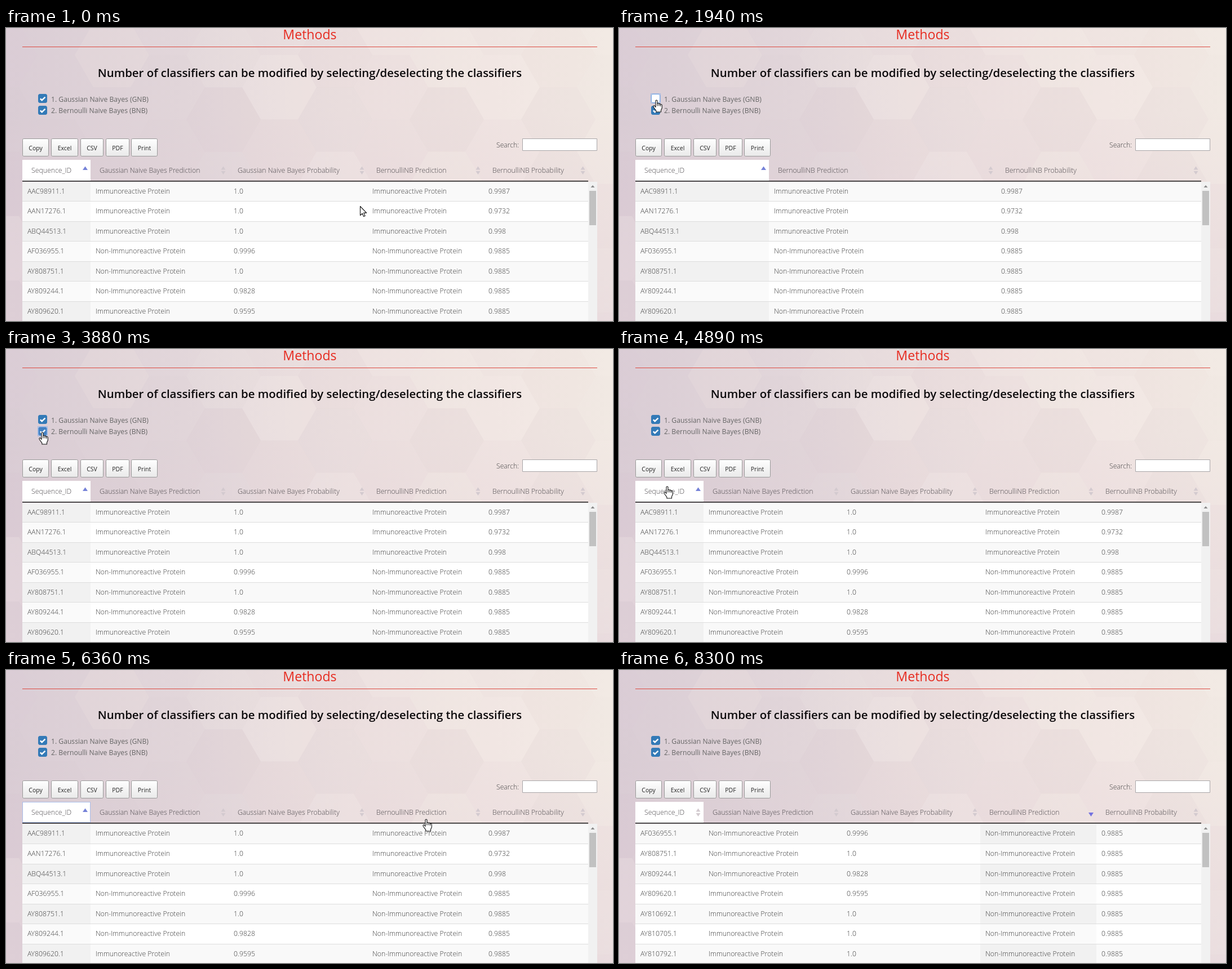
These frames come from a looping animation (1077 by 520 pixels, 8.61 s). An HTML page with a canvas:

```html
<!DOCTYPE html>
<html lang="en">
<head>
<meta charset="utf-8">
<title>Methods</title>
<style>
html, body { margin: 0; width: 100%; height: 100%; overflow: hidden; background: #e6dadd; }
canvas { display: block; width: 1077px; height: 520px; }
</style>
</head>
<body>
<canvas id="stage" width="1077" height="520"></canvas>
<script>
const W = 1077, H = 520, LOOP = 8610;
const ctx = document.getElementById('stage').getContext('2d');

const parse = s => s.split('\n').map(line => line.trim().split(' '));
const first = parse(`AAC98911.1 I 1.0 I 0.9987
  AAN17276.1 I 1.0 I 0.9732
  ABQ44513.1 I 1.0 I 0.998
  AF036955.1 N 0.9996 N 0.9885
  AY808751.1 N 1.0 N 0.9885
  AY809244.1 N 0.9828 N 0.9885
  AY809620.1 I 0.9595 N 0.9885
  AY810692.1 I 1.0 N 0.9885
  AY810705.1 I 1.0 N 0.9885
  AY810792.1 I 1.0 N 0.9885`);
const last = parse(`M14654.1 I 0.9979 N 0.9885
  EF553319.1 I 0.9999 N 0.9885
  CCD59145.1 I 1.0 I 0.9476
  AY816000.2 I 1.0 N 0.9885
  AY815815.1 N 0.9999 N 0.9885
  AY815419.1 I 1.0 N 0.9885
  AY815196.1 I 1.0 N 0.9885`);
const orders = {
  idAsc: first.slice(0, 7),
  idDesc: last,
  predAsc: [...first.slice(0, 3), last[2], ...first.slice(3, 6)],
  predDesc: first.slice(3)
};
const words = { I: 'Immunoreactive Protein', N: 'Non-Immunoreactive Protein' };
const heads = ['Sequence_ID', 'Gaussian Naive Bayes Prediction', 'Gaussian Naive Bayes Probability',
  'BernoulliNB Prediction', 'BernoulliNB Probability'];
const widths = [121, 245, 246, 206, 186];
const LEFT = 29, RIGHT = 1033;

function text(s, x, y, size, color, weight = 300, align = 'left') {
  ctx.font = `${weight} ${size}px "Open Sans", "Noto Sans", sans-serif`;
  ctx.textAlign = align;
  ctx.fillStyle = color;
  ctx.fillText(s, x, y);
}

function rect(x, y, w, h, color) {
  ctx.fillStyle = color;
  ctx.fillRect(x, y, w, h);
}

function box(x, y, w, h, r, fill, border) {
  ctx.beginPath();
  ctx.roundRect(x + .5, y + .5, w - 1, h - 1, r);
  ctx.fillStyle = fill;
  ctx.fill();
  ctx.strokeStyle = border;
  ctx.lineWidth = 1;
  ctx.stroke();
}

// Triangle with its base at y and its point dy away
function tri(x, y, dy, half, color) {
  ctx.beginPath();
  ctx.moveTo(x - half, y);
  ctx.lineTo(x + half, y);
  ctx.lineTo(x, y + dy);
  ctx.fillStyle = color;
  ctx.fill();
}

function paintBackdrop(c) {
  const g = c.createLinearGradient(0, 200, W, 90);
  [[0, '#dacdd5'], [.3, '#e1d5d9'], [.55, '#ebdfde'], [.8, '#efe4e1'], [1, '#f2eae4']]
    .forEach(([p, color]) => g.addColorStop(p, color));
  c.fillStyle = g;
  c.fillRect(0, 0, W, H);
  const v = c.createLinearGradient(0, 150, 0, H);
  v.addColorStop(0, 'rgba(228,208,218,0)');
  v.addColorStop(1, 'rgba(228,208,218,.45)');
  c.fillStyle = v;
  c.fillRect(0, 0, W, H);
  let seed = 11;
  const rnd = () => (seed = seed * 16807 % 2147483647) / 2147483647;
  const R = 66, step = R * Math.sqrt(3);
  for (let i = 0; i < 12; i++) {
    for (let j = -1; j < 6; j++) {
      const x = -10 + i * R * 1.5, y = 48 + (j + (i % 2) / 2) * step, a = rnd();
      c.beginPath();
      for (let k = 0; k < 6; k++) {
        c.lineTo(x + R * Math.cos(k * Math.PI / 3), y + R * Math.sin(k * Math.PI / 3));
      }
      c.fillStyle = a > .5 ? `rgba(255,246,238,${(a - .5) * .34})` : `rgba(190,165,180,${(.5 - a) * .14})`;
      c.fill();
    }
  }
}
const backdrop = document.createElement('canvas');
backdrop.width = W;
backdrop.height = H;
paintBackdrop(backdrop.getContext('2d'));

function checkbox(y, on, focus) {
  if (focus) {
    ctx.strokeStyle = 'rgba(120,170,235,.55)';
    ctx.lineWidth = 1;
    ctx.strokeRect(56.5, y - .5, 17, 17);
  }
  const fill = on ? (focus ? '#4381c2' : '#337ab7') : '#fff';
  box(57, y, 16, 16, 2.5, fill, focus ? '#78a8e4' : on ? '#337ab7' : '#aaa');
  if (!on) return;
  ctx.beginPath();
  ctx.moveTo(60.8, y + 8.3);
  ctx.lineTo(63.7, y + 11.2);
  ctx.lineTo(69.5, y + 5.6);
  ctx.strokeStyle = '#fff';
  ctx.lineWidth = 2.4;
  ctx.stroke();
}

function button(label, x, w) {
  const g = ctx.createLinearGradient(0, 196, 0, 228);
  g.addColorStop(0, '#fff');
  g.addColorStop(1, '#e9e9e9');
  box(x, 196, w, 32, 2, g, '#999');
  text(label, x + w / 2, 216.5, 10.5, '#222', 400, 'center');
}

function page(s) {
  ctx.drawImage(backdrop, 0, 0);
  text('Methods', 539, 20, 23.1, '#e62b20', 500, 'center');
  rect(29, 33, 1020, 1, '#dc4a41');
  text('Number of classifiers can be modified by selecting/deselecting the classifiers',
    539, 87, 20.4, '#0c0a0c', 600, 'center');
  checkbox(117, s.gnb, s.focus === 1);
  checkbox(138, s.bnb, s.focus === 2);
  text('1. Gaussian Naive Bayes (GNB)', 80, 131, 12.15, '#666', 400);
  text('2. Bernoulli Naive Bayes (BNB)', 80, 151, 12.15, '#666', 400);
  [['Copy', 29, 47], ['Excel', 80, 48], ['CSV', 132, 41], ['PDF', 177, 42], ['Print', 222, 47]]
    .forEach(b => button(...b));
  text('Search:', 870, 212, 12.2, '#444');
  box(916, 196, 133, 22, 0, '#fff', '#a9a6a8');
}

function table(s) {
  const cols = s.cols, total = cols.reduce((sum, c) => sum + widths[c], 0);
  const scale = (RIGHT - LEFT) / total;
  const xs = [LEFT];
  cols.forEach((c, i) => xs.push(xs[i] + widths[c] * scale));
  const edge = xs.map(Math.round);
  const [key, dir] = s.order.startsWith('id') ? [0, s.order.slice(2)] : [3, s.order.slice(4)];

  rect(LEFT, 234, edge[1] - LEFT, 37, '#fff');
  cols.forEach((c, i) => {
    text(heads[c], edge[i] + 16, 257, 12.27, '#504c50');
    const x = edge[i + 1] - 9.5;
    if (c !== key) {
      tri(x, 251.5, -6, 4, '#d3cacf');
      tri(x, 254, 6, 4, '#d3cacf');
    } else if (dir === 'Asc') tri(x, 252, -6.5, 4.5, '#7582d8');
    else tri(x, 253, 7, 4.5, '#7472e0');
  });
  if (s.focus === 3) {
    ctx.strokeStyle = '#a9bdea';
    ctx.lineWidth = 1;
    ctx.strokeRect(29.5, 234.5, edge[1] - 30, 36);
  }

  let top = 273;
  orders[s.order].forEach((row, i) => {
    const line = Math.floor(307.5 + s.shift + 35.5 * i);
    const odd = i % 2 === 0;
    rect(LEFT, top, RIGHT - LEFT, line - top, odd ? '#f9f9f9' : '#fff');
    const k = cols.indexOf(key);
    rect(edge[k], top, edge[k + 1] - edge[k], line - top, odd ? '#f1f1f1' : '#fafafa');
    rect(LEFT, line, RIGHT - LEFT, 1, '#ddd');
    const base = Math.floor(294 + (i ? s.shift : 0) + 35.5 * i);
    cols.forEach((c, j) => text(words[row[c]] || row[c], edge[j] + 9, base, 12.25, '#3f3f3f'));
    top = line + 1;
  });
  rect(LEFT, 271, RIGHT - LEFT, 1.5, '#1a1a1a');

  rect(RIGHT, 273, 16, 247, '#f1f1f1');
  tri(1041, 283, -4, 3.5, '#8a8a8a');
  rect(1035, 289, 12, 61, '#c1c1c1');
}

const arrow = new Path2D('M0 0V16L3.7 12.6L6.1 18L8.6 17L6.2 11.6H11.2Z');
const hand = new Path2D('M-1.5 13V1.5Q0 -.6 1.5 1.5V7Q3.2 5 4.5 7.2Q6.2 5.7 7.2 8.2' +
  'Q9.6 7.2 9.8 10V14.5L8 18.5V21.5H-.6V19.4L-5.2 13Q-6.2 10 -3.8 10.2Z');
const knuckles = new Path2D('M1.5 7V11M4.5 7.5V11M7.2 8.5V11.5');

function cursor([x, y]) {
  if (y > H) return;
  const overLabel = x > 56 && x < 254 && y > 116 && y < 157;
  const overHead = x > LEFT && x < RIGHT && y > 233 && y < 272;
  const overButton = x > LEFT && x < 269 && y > 195 && y < 228;
  const pointing = overLabel || overHead;
  ctx.save();
  ctx.translate(x + .5, y + .5);
  ctx.lineJoin = 'round';
  ctx.strokeStyle = '#111';
  ctx.fillStyle = '#fff';
  ctx.lineWidth = 1.1;
  const shape = pointing || overButton ? hand : arrow;
  ctx.fill(shape);
  ctx.stroke(shape);
  if (shape === hand) ctx.stroke(knuckles);
  ctx.restore();
}

const moves = [
  [80, 690, 9, [628, 316], [190, 54], [66, 127]],
  [2480, 2630, 3, [66, 127], [65, 137], [64, 147]],
  [4350, 4660, 5, [64, 147], [70, 195], [85, 243]],
  [5900, 6360, 7, [85, 243], [480, 250], [745, 264]],
  [6440, 6590, 3, [745, 264], [746, 260], [744, 257]],
  [7840, 8300, 7, [744, 257], [850, 390], [1027, 521]]
];

function pointer(t) {
  let pos = moves[0][3];
  for (const [t0, t1, n, a, b, c] of moves) {
    if (t < t0) break;
    const p = Math.min(1, (Math.floor((t - t0) / (t1 - t0) * (n - 1) + 1e-6) + 1) / n), q = 1 - p;
    pos = a.map((v, i) => v * q * q + 2 * b[i] * p * q + c[i] * p * p);
  }
  return pos;
}

const all = [0, 1, 2, 3, 4];
const events = [
  [0, { gnb: true, bnb: true, focus: 0, cols: all, order: 'idAsc', shift: 0 }],
  [1090, { focus: 1 }],
  [1240, { gnb: false }],
  [1310, { cols: [0, 3, 4] }],
  [2090, { gnb: true }],
  [2170, { cols: all }],
  [2860, { focus: 2 }],
  [2940, { bnb: false }],
  [3020, { cols: [0, 1, 2] }],
  [3880, { bnb: true, cols: all }],
  [4890, { focus: 0 }],
  [4970, { order: 'idDesc', shift: 1 }],
  [5590, { order: 'idAsc', focus: 3 }],
  [6590, { focus: 0 }],
  [6760, { order: 'predAsc' }],
  [7520, { order: 'predDesc' }]
];
const stateAt = t => Object.assign({}, ...events.filter(e => e[0] <= t).map(e => e[1]));

const start = performance.now();
function frame(now) {
  const t = Math.max(0, now - start) % LOOP;
  const s = stateAt(t);
  page(s);
  table(s);
  cursor(pointer(t));
  requestAnimationFrame(frame);
}
frame(start);
</script>
</body>
</html>
```
